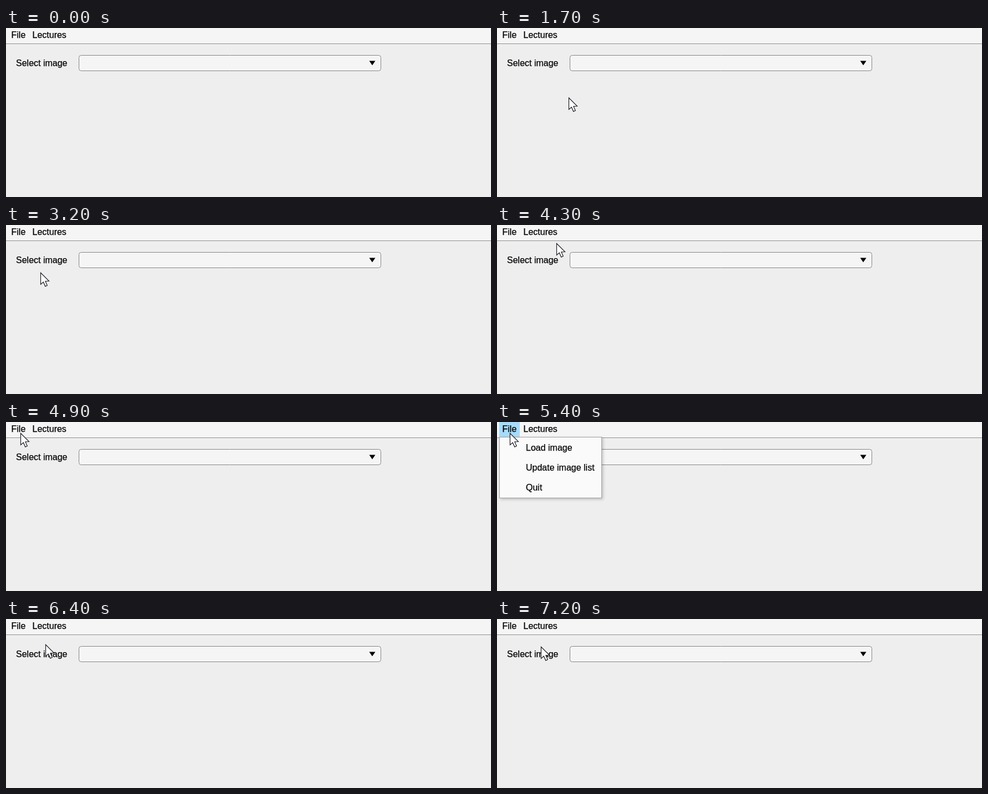
These frames come from a looping animation (874 by 306 pixels, 8000 ms). An HTML page with a canvas:

```html
<!DOCTYPE html>
<html lang="en">
<head>
<meta charset="utf-8">
<title>Image selector</title>
<style>
  html, body { margin: 0; width: 100%; height: 100%; overflow: hidden; background: #eee; }
  canvas { display: block; }
</style>
</head>
<body>
<canvas id="stage" width="874" height="306"></canvas>
<script>
const stage = document.getElementById('stage');
const ctx = stage.getContext('2d', { alpha: false });
const { width: W, height: H } = stage;

const LOOP = 8000, STEP = 100;
const SHOW = 1500, OPEN = 5400, CLOSE = 6400;
const BLUE = '#a6dbfb', PALE = '#f5f5f5', BACK = '#eeeeee';
const MENU = { x: 4, y: 27, w: 185, row: 36, items: ['Load image', 'Update image list', 'Quit'] };
MENU.h = MENU.items.length * MENU.row + 3;

// Pointer strokes between rests; settle makes a stroke slow down at its end
const home = { x: 143, y: 133 };
const moves = [
  { from: 1500, to: 1700, x: 129, y: 126 },
  { from: 1700, to: 2400, x: 90, y: 64 },
  { from: 2400, to: 3200, x: 62, y: 86, settle: true },
  { from: 3700, to: 4000, x: 61, y: 187 },
  { from: 4000, to: 4300, x: 107, y: 33 },
  { from: 4300, to: 5200, x: 23, y: 20, settle: true },
  { from: 5600, to: 6200, x: 64, y: 43, settle: true },
  { from: 6300, to: 6800, x: 79, y: 50, settle: true }
];

const clamp = k => Math.min(1, Math.max(0, k));
const easeOut = k => 1 - (1 - k) ** 3;

function pointerAt(t) {
  let { x, y } = home;
  for (const m of moves) {
    const k = clamp((t - m.from) / (m.to - m.from));
    const e = m.settle ? easeOut(k) : k;
    x += (m.x - x) * e;
    y += (m.y - y) * e;
  }
  return { x: Math.round(x), y: Math.round(y) };
}

function box(x, y, w, h, fill, stroke, line = 1) {
  ctx.fillStyle = fill;
  ctx.fillRect(x, y, w, h);
  if (!stroke) return;
  ctx.strokeStyle = stroke;
  ctx.lineWidth = line;
  ctx.strokeRect(x + line / 2, y + line / 2, w - line, h - line);
}

function label(text, x, y) {
  ctx.fillStyle = ctx.strokeStyle = '#000';
  ctx.lineWidth = 0.25;
  ctx.fillText(text, x, y);
  ctx.strokeText(text, x, y);
}

function shape(path, fill, stroke, line) {
  ctx.fillStyle = fill;
  ctx.fill(path);
  if (!stroke) return;
  ctx.strokeStyle = stroke;
  ctx.lineWidth = line;
  ctx.stroke(path);
}

const field = new Path2D();
field.roundRect(131.5, 49.5, 544, 28, 4);
const arrow = new Path2D('M654.5 59.5h11l-5.5 8z');
const pointer = new Path2D('M0 0V21L4.8 16.7 8.3 24.6 11.8 23 8.4 15.4 15 15Z');

function drawWindow(menuOpen) {
  box(0, 0, W, H, BACK);
  box(0, 0, W, 28, PALE);
  box(0, 28, W, 1, '#909090');
  if (menuOpen) box(MENU.x, 0, 37, MENU.y, BLUE);
  label('File', 9.5, 18);
  label('Lectures', 47.5, 18);
  label('Select image', 18, 69);
  shape(field, PALE, '#858585', 1);
  shape(arrow, '#000');
}

function drawMenu(hover) {
  const { x, y, w, h, row, items } = MENU;
  ctx.save();
  ctx.shadowColor = 'rgba(0, 0, 0, 0.22)';
  ctx.shadowBlur = 5;
  ctx.shadowOffsetX = ctx.shadowOffsetY = 2;
  box(x, y, w, h, '#fafafa');
  ctx.restore();
  box(x, y, w, h, '#fafafa', '#a2a2a2');
  if (hover) box(x + 1, y + 1, w - 2, row, BLUE, '#2ba3e3', 2);
  items.forEach((item, i) => label(item, 52, y + 25 + i * row));
}

function drawPointer({ x, y }) {
  ctx.save();
  ctx.translate(x + 0.5, y + 0.5);
  shape(pointer, '#fff', '#1c1c24', 1.2);
  ctx.restore();
}

function draw(now) {
  const t = Math.floor((now % LOOP) / STEP) * STEP;
  const menuOpen = t >= OPEN && t < CLOSE;
  const tip = pointerAt(t);
  ctx.font = '16px "Liberation Sans", Arial, sans-serif';
  drawWindow(menuOpen);
  if (menuOpen) drawMenu(tip.y > MENU.y);
  if (t >= SHOW) drawPointer(tip);
}

let start;
function tick(now) {
  start ??= now;
  draw(Math.max(0, now - start));
  requestAnimationFrame(tick);
}
draw(0);
requestAnimationFrame(tick);
</script>
</body>
</html>
```
